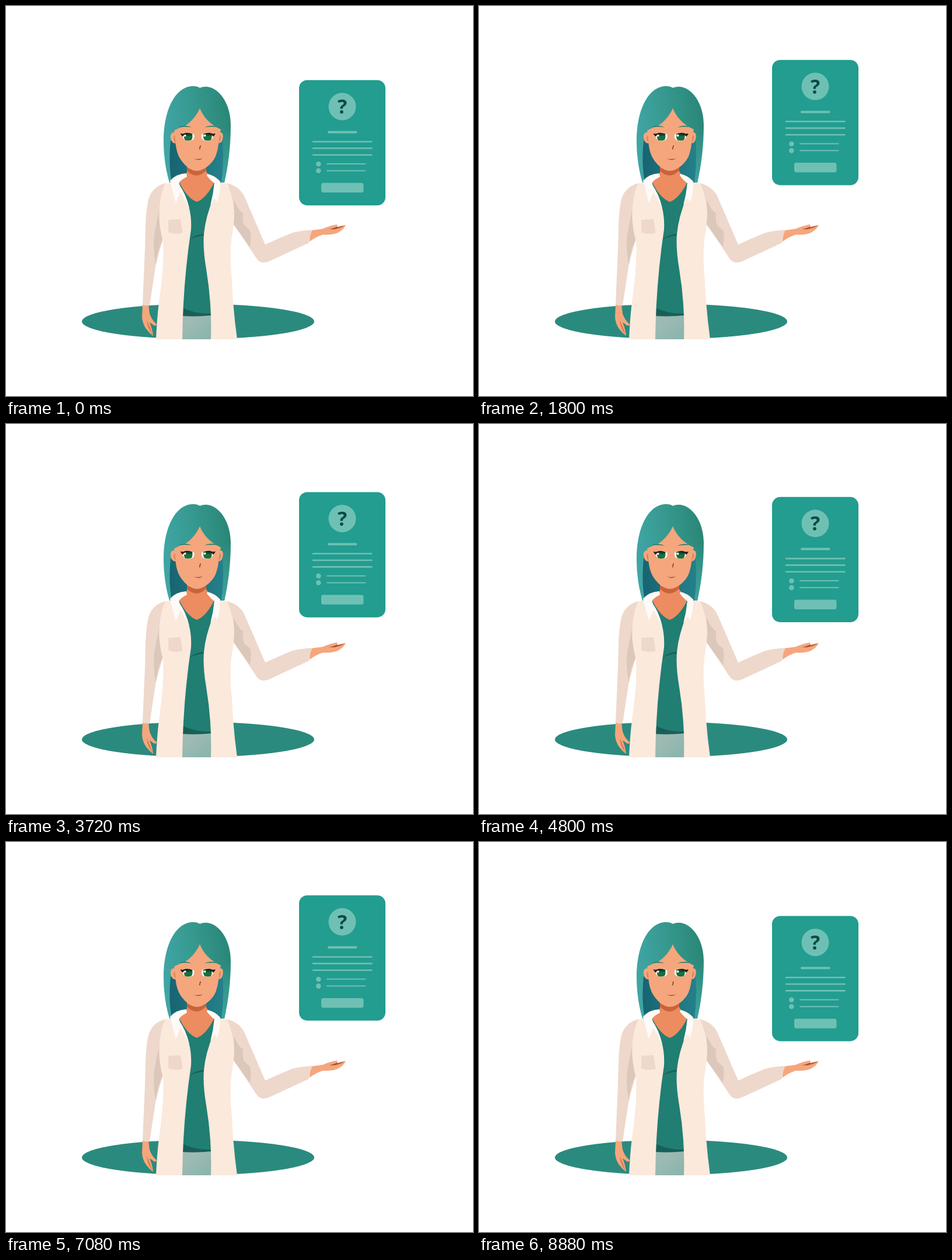
An HTML page that plays this animation: 800x667 px, repeating every 9 s.

```html
<!DOCTYPE html>
<html lang="en">
<head>
<meta charset="utf-8">
<title>Presenter with floating form</title>
<style>
  html, body { margin: 0; width: 100%; height: 100%; overflow: hidden; background: #fff; }
  svg { display: block; width: 100%; height: 100%; }
  .skin { fill: #f5a67c; }
  .sleeve { fill: #eed8cb; }
  .fold { fill: #dcc8ba; }
  .coat { fill: #fbe9dc; }
  .collar { fill: #fefaf7; }
  .brow { fill: #1f786e; }
  .line { fill: none; stroke-linecap: round; }
  .pale { fill: #6fc0b4; }
  #card .line { stroke: #6fc0b4; }
  #card text { font: 700 34px "Open Sans", "Noto Sans", sans-serif; fill: #0d4b46; text-anchor: middle; }
</style>
</head>
<body>
<svg viewBox="0 0 800 667">
  <defs>
    <linearGradient id="hair" x1="0" y1=".35" x2="1" y2=".15">
      <stop offset="0" stop-color="#3fa5a4"/>
      <stop offset=".45" stop-color="#36998f"/>
      <stop offset="1" stop-color="#298575"/>
    </linearGradient>
    <linearGradient id="lock" x1="0" y1="0" x2="0" y2="1">
      <stop offset="0" stop-color="#3ca39c" stop-opacity="0"/>
      <stop offset="1" stop-color="#3ca39f"/>
    </linearGradient>
    <linearGradient id="shade">
      <stop offset="0" stop-color="#176472"/>
      <stop offset="1" stop-color="#25808a"/>
    </linearGradient>
    <linearGradient id="trousers" x1="0" y1="0" x2="1" y2="1">
      <stop offset=".3" stop-color="#9dbab3"/>
      <stop offset="1" stop-color="#86b4ab"/>
    </linearGradient>
    <g id="eyeball">
      <path fill="#fff" d="M301 219Q312 214 322 219Q324 225 320 229Q312 232 306 229Q302 225 301 219Z"/>
      <path fill="#17703d" d="M305 219Q312 216 319 219Q320.500 227 317 229.500Q311 231 307 229.500Q304 226 305 219Z"/>
      <path fill="#0f4a2f" d="M305 219Q312 216 319 219V221.500Q312 223 305 221.500Z"/>
    </g>
    <path id="lash" fill="#2a1a1c" d="M298.500 218L303 218.500Q311 214.500 321.500 219.500Q311 217.800 305 220.500L302.500 223.500Q300 221 298.500 218Z"/>
  </defs>

  <ellipse cx="329" cy="539.500" rx="199" ry="30" fill="#2b8a7e"/>

  <!-- Hair -->
  <path fill="url(#hair)" d="M332 140C326 136 314 136 305 141C282 153 270 190 270 230C270 258 274 282 280 302H374C380 275 385 240 385 203C385 178 375 154 358 143C349 137 339 137 332 140Z"/>
  <path fill="url(#lock)" d="M371 205H385Q386 250 374 302H368Z"/>
  <path fill="url(#shade)" d="M282 230H371Q374 265 369 302H284Q278 270 282 230Z"/>

  <!-- Neck and shirt -->
  <path fill="#ec8c60" d="M310 270H343V283Q349 292 359 299L346 336H313L294 301Q309 295 310 283Z"/>
  <path fill="#c9633b" d="M310 276Q326 285 343 274V281Q327 298 310 282Z"/>
  <path fill="#217e72" d="M296 300Q310 329 327 335Q343 329 357 301L362 340L345 400L353 530H301V480L314 400L295 320Z"/>
  <path fill="#195f57" d="M313 400Q324 391 342 389V392Q327 393 313 400ZM302 516Q325 527 352 526V531H302Z"/>
  <path fill="url(#trousers)" d="M301 530Q326 532 353 529V570H301Z"/>

  <!-- Face -->
  <path class="skin" d="M291 217C285 214 281 219 282 226Q284 236 292 235ZM365 217C371 214 373 220 371 228Q369 236 363 234Z"/>
  <path fill="#d9805a" d="M290 220Q285 224 289 232L291 235ZM366 220Q370 225 366 231L364 234Z"/>
  <path class="skin" d="M332 175C326 189 314 201 305 206Q297 208 288 213C291 228 289 241 296 257C302 269 315 282 327 282C339 282 354 269 359 257C365 242 364 228 368 211C351 204 338 190 332 175Z"/>
  <path id="browLeft" class="brow" d="M296 207Q307 202.500 318 207.500Q307 206 296 207Z"/>
  <path id="browRight" class="brow" d="M340 207.500Q351 202.500 362 207Q351 206 340 207.500Z"/>
  <g id="eyeballs">
    <use href="#eyeball"/>
    <use href="#eyeball" transform="matrix(-1 0 0 1 657.500 0)"/>
    <g fill="#fff"><circle cx="306.500" cy="221.500" r="2"/><circle cx="340.500" cy="221.500" r="2"/></g>
  </g>
  <g id="lashes">
    <use href="#lash"/>
    <use href="#lash" transform="matrix(-1 0 0 1 657.500 0)"/>
  </g>
  <path class="line" stroke="#633027" stroke-width="1.300" d="M333 239L331.700 244.500"/>
  <path fill="#91382c" d="M322 261Q330 263 337.500 260.500Q330 265.500 322 261Z"/>

  <!-- Left arm -->
  <path class="skin" d="M234 510H244L246 526Q250 538 258 544Q258 548 253 546L246 541Q251 553 252 564Q245 559 240 552Q234 544 233 532Z"/>
  <path fill="#d9794f" d="M241 537Q247 549 251 562Q242 551 241 537Z"/>
  <path class="sleeve" d="M273 303C257 307 246 318 243 335C238 361 239 391 238 416L234 511Q240 513 246 512L257 440L269 398L272 340Z"/>
  <path class="fold" d="M263 345L254 390Q251 418 257 443Q258 418 270 397Z"/>

  <!-- Right arm -->
  <path class="skin" d="M521 384L543 381Q553 376 567 373.500Q569 376 562 379Q571 376 582 374.500Q579 382 568 388Q557 392 543 391Q530 395 520 403Z"/>
  <path fill="#a34c32" d="M553 382Q563 380 568 376L567 379Q573 377 580 375.500Q568 383 553 382Z"/>
  <path class="sleeve" d="M379 303Q401 309 409 327L444 408Q470 396 490 388Q506 384 525 383Q520 393 519 405L450 437Q437 442 430 433L390 373Z"/>
  <path class="fold" d="M390 332Q400 352 406 354Q405 370 408 375L418 384Q421 391 418 412L390 374Z"/>

  <!-- Coat -->
  <path class="coat" d="M273 303L296 302L302 317Q319 345 317 382Q303 475 302 570H257Q259 525 264 492Q271 440 269 403Q259 367 264 335Q267 315 273 303Z"/>
  <path class="coat" d="M357 302L379 303Q390 330 391 352Q391 374 386 400Q383 430 387 470Q389 520 396 570H351Q353 510 343 450Q337 415 339 390Q342 360 355 329Z"/>
  <path class="sleeve" d="M278 366L299 364.500L302.500 388Q291 392 278 387Z"/>
  <path class="collar" d="M309 286Q291 287 281 299Q285 316 291 337L299 318L314 346Q308 320 296 305Q296 299 310 292Z"/>
  <path class="collar" d="M345 287Q358 290 367 300Q368 316 362 335L357 329L350 341Q355 322 357 303Q351 299 344 290Z"/>

  <!-- Floating form -->
  <g id="card">
    <rect x="502" y="126.700" width="148" height="214.300" rx="14" fill="#229d8f"/>
    <circle class="pale" cx="576" cy="172" r="23.500"/>
    <text x="576" y="184">?</text>
    <path class="line" stroke-width="4" d="M553 215.700H599.500"/>
    <path class="line" stroke-width="2.600" d="M526 232H626.500M526 243.300H626.500M526 254.700H626.500"/>
    <path class="line" stroke-width="2" d="M550 270H615.500M550 281.700H615.500"/>
    <circle class="pale" cx="535.300" cy="270.200" r="4.300"/>
    <circle class="pale" cx="535.300" cy="281.800" r="4.300"/>
    <rect class="pale" x="540" y="302.500" width="72.500" height="16.500" rx="3.500"/>
  </g>
</svg>
<script>
  const LOOP = 9000, STEP = 120;
  const FLOAT_PERIOD = 4500, RISE_TIME = 2220, FLOAT_HEIGHT = 38;
  const BLINKS = [1000, 3000, 5000], BLINK_HALF = 210;
  const EYE_BOTTOM = 227;
  const set = (id, transform) => document.getElementById(id).setAttribute("transform", transform);
  const smooth = x => x * x * (3 - 2 * x);

  function floatLift(time) {
    const t = time % FLOAT_PERIOD;
    const share = t < RISE_TIME ? t / RISE_TIME : (FLOAT_PERIOD - t) / (FLOAT_PERIOD - RISE_TIME);
    return FLOAT_HEIGHT * smooth(share);
  }

  function eyeClosure(time) {
    return Math.max(0, ...BLINKS.map(middle => 1 - Math.abs(time - middle) / BLINK_HALF));
  }

  function draw(now) {
    const time = Math.floor((now % LOOP) / STEP) * STEP;
    const closure = eyeClosure(time);
    const squeeze = 0.8 * closure;
    const frown = Math.min(1, closure * 2.2);
    set("card", `translate(0 ${-floatLift(time)})`);
    set("eyeballs", `translate(0 ${EYE_BOTTOM * squeeze}) scale(1 ${1 - squeeze})`);
    set("lashes", `translate(0 ${6 * closure})`);
    set("browLeft", `translate(${2 * frown} ${4 * frown}) rotate(${14 * frown} 307 206)`);
    set("browRight", `translate(${-2 * frown} ${4 * frown}) rotate(${-14 * frown} 351 206)`);
    requestAnimationFrame(draw);
  }

  draw(performance.now());
</script>
</body>
</html>
```
